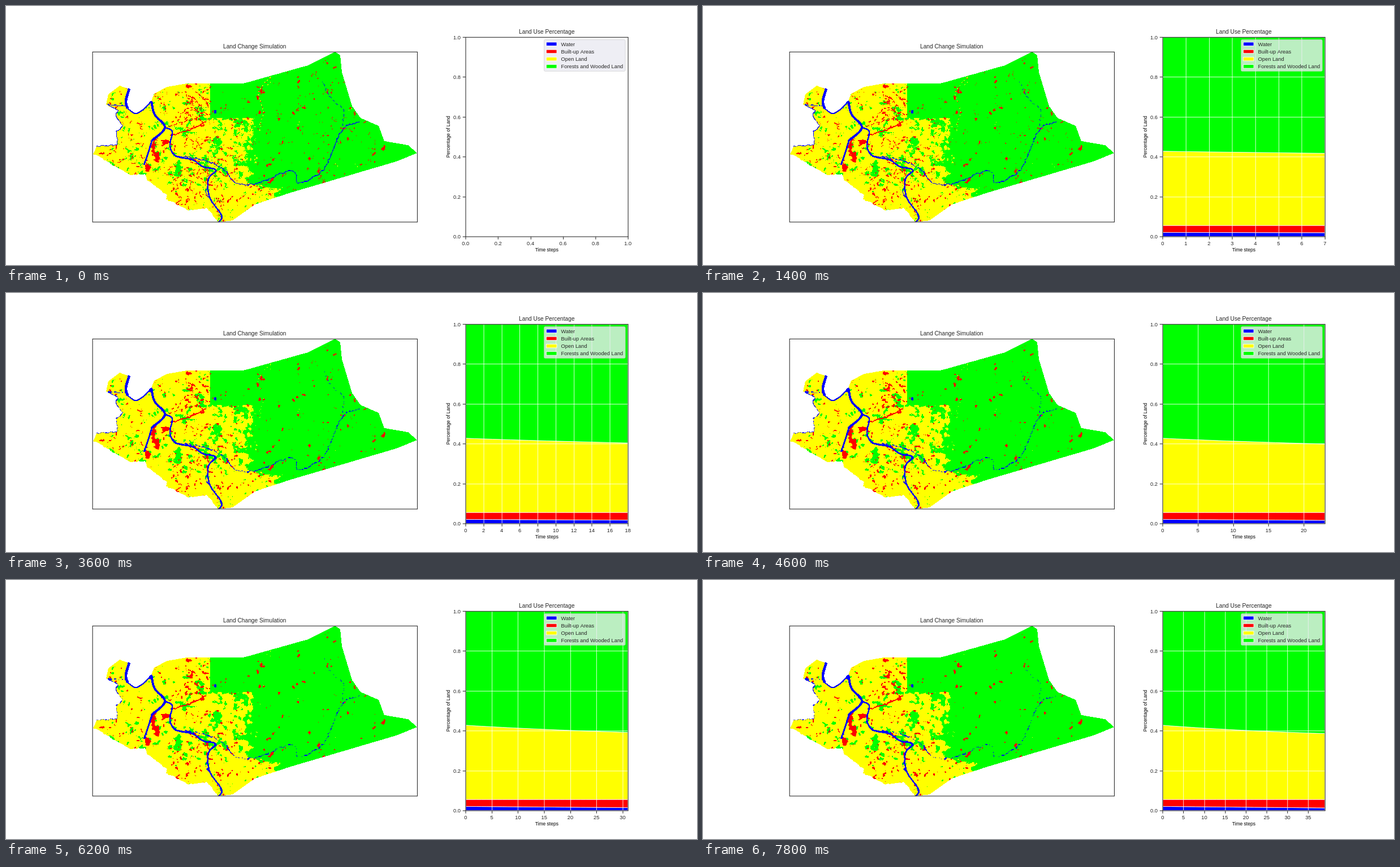
Recreate the animation shown at these times as an HTML page with a canvas. Size 1222 by 458 pixels, loop 8 s.

```html
<!DOCTYPE html>
<html lang="en">
<head>
<meta charset="utf-8">
<title>Land Change Simulation</title>
<style>
  html, body { margin: 0; width: 100%; height: 100%; overflow: hidden; background: #fff; }
  canvas { display: block; }
</style>
</head>
<body>
<canvas id="stage" width="1222" height="458"></canvas>
<script>
const ctx = document.getElementById('stage').getContext('2d');
const STEPS = 40, STEP_MS = 200;
const NONE = 0, WATER = 1, BUILT = 2, OPEN = 3, FOREST = 4;
const RGB = [[255, 255, 255], [0, 0, 255], [255, 0, 0], [255, 255, 0], [0, 255, 0]];
const NAMES = ['', 'Water', 'Built-up Areas', 'Open Land', 'Forests and Wooded Land'];
const css = c => `rgb(${RGB[c]})`;

// The map is in stage pixels; the figure around it is laid out on a 1600 x 600 sheet.
const MAP = { x: 153, y: 81, w: 574, h: 301 };
const FIG = { w: 1600, h: 600, pt: 100 / 72 };
const LEFT = { x: 200, y: 106, w: 751.5, h: 394 };
const RIGHT = { x: 1064.24, y: 72, w: 375.76, h: 462 };
const INK = '#262626';

// ---- chance and noise ----
function hash(x, y) {
  let h = Math.imul(x, 374761393) ^ Math.imul(y, 668265263);
  h = Math.imul(h ^ (h >>> 13), 1274126177);
  h = Math.imul(h ^ (h >>> 15), 2246822519);
  return ((h ^ (h >>> 16)) >>> 0) / 2 ** 32;
}
let draws = 0;
const random = (a, b) => a + (b - a) * hash(++draws, 77);
const mix = (a, b, t) => a + (b - a) * t;
const ramp = (v, a, b) => Math.min(1, Math.max(0, (v - a) / (b - a)));
const ease = t => t * t * (3 - 2 * t);
function noise(x, y) {
  const i = Math.floor(x), j = Math.floor(y), u = ease(x - i), v = ease(y - j);
  return mix(mix(hash(i, j), hash(i + 1, j), u), mix(hash(i, j + 1), hash(i + 1, j + 1), u), v);
}
const texture = (x, y) => .45 * noise(x / 9, y / 9) + .3 * noise(x / 4, y / 4) + .25 * noise(x / 1.6, y / 1.6) - .5;
const bump = (x, y, cx, cy, rx, ry) => Math.exp(-(((x - cx) / rx) ** 2) - ((y - cy) / ry) ** 2);

// ---- terrain ----
function forestBias(x, y) {
  if (y < 198) return x > 360 ? 1 : -.2;
  const e = x - 35 * ramp(y, 312, 322);
  return mix(-.21, -.05, ramp(e, 280, 420)) + .6 * ramp(e, 420, 470)
    - .12 * ramp(y, 312, 325) + .45 * bump(x, y, 304, 290, 8, 9);
}
function cover(x, y) {
  const city = Math.max(bump(x, y, 260, 250, 5, 9), bump(x, y, 267, 268, 5, 8),
    bump(x, y, 252, 286, 5, 8), bump(x, y, 282, 239, 5, 5), bump(x, y, 321, 142, 6, 4));
  if (texture(x + 500, y) + .6 * city > .25) return BUILT;
  return texture(x, y) + forestBias(x, y) > 0 ? FOREST : OPEN;
}

const points = text => text.split(' ').map(p => p.split(',').map(Number));

// Runs through key points, straight (curl 0) or curved (curl 1), shaken by noise.
function course(text, curl, shake) {
  const keys = points(text), out = [];
  for (let i = 0; i + 1 < keys.length; i++) {
    const [a, b] = [keys[i], keys[i + 1]], before = keys[i - 1] || a, after = keys[i + 2] || b;
    const n = Math.ceil(Math.hypot(b[0] - a[0], b[1] - a[1]) / 2);
    for (let s = 0; s <= n; s++) {
      const t = s / n;
      const [x, y] = [0, 1].map(d => mix(a[d], b[d], ease(t)) + curl / 2 *
        (t * (1 - t) ** 2 * (b[d] - before[d]) - t * t * (1 - t) * (after[d] - a[d])));
      out.push([x + (noise(x / 3, y / 3) - .5) * 2 * shake, y + (noise(y / 3 + 40, x / 3) - .5) * 2 * shake]);
    }
  }
  return out;
}

const coast = [
  ...course('177,174 181,156 201,141 218,147 212,168 216,183 229,190 244,182 257,168 262,155 285,143 320,137 420,137 ' +
    '534,105 582,81 591,87 594,117 612,177 627,198 659,212 669,239 711,246 727,260 690,275 500,331 440,351 401,379 376,382', 0, 0),
  ...course('376,382 355,358 322,361 283,342 284,334 250,308 246,297 220,299 154,261 160,248 197,245 196,222 206,212 193,194 198,184 177,174', 0, 1.5)
];

function buildMap() {
  const canvas = document.createElement('canvas');
  canvas.width = MAP.w;
  canvas.height = MAP.h;
  const g = canvas.getContext('2d', { willReadFrequently: true });
  const image = g.createImageData(MAP.w, MAP.h);
  for (let i = 0; i < MAP.w * MAP.h; i++) {
    image.data.set([...RGB[cover(MAP.x + i % MAP.w, MAP.y + Math.floor(i / MAP.w))], 255], i * 4);
  }
  g.putImageData(image, 0, 0);
  g.translate(-MAP.x, -MAP.y);
  g.lineJoin = 'round';

  function trace(path) {
    g.beginPath();
    path.forEach(p => g.lineTo(...p));
  }
  function line(c, width, path, dash = []) {
    g.strokeStyle = css(c);
    g.lineWidth = width;
    g.setLineDash(dash);
    trace(path);
    g.stroke();
  }
  function wander(c, x, y, length, dash) {
    const path = [[x, y]];
    let heading = random(0, 7);
    for (let s = 0; s < length; s += 2) {
      heading += random(-.8, .8);
      path.push([x += 2 * Math.cos(heading), y += 2 * Math.sin(heading)]);
    }
    line(c, random(1.1, 1.7), path, dash);
  }

  // hamlets and lanes, crowded in the middle of the open land
  for (let n = 0; n < 110; n++) {
    const x = 240 + random(0, 100) + random(0, 100), y = random(150, 365);
    if (y > 200 || x < 358) wander(BUILT, x, y, random(3, 22), [5, 2]);
  }
  for (let n = 0; n < 20; n++) wander(BUILT, random(180, 245), random(180, 290), random(2, 8));
  for (let n = 0; n < 14; n++) wander(n % 3 ? BUILT : OPEN, random(445, 640), random(130, 290), 12, [2, 4]);
  line(OPEN, 1.1, course('467,126 446,152 455,188 446,225', 1, 2), [3, 4]);
  line(BUILT, 1.2, course('467,128 446,152 455,188 446,220', 1, 2), [2, 9]);
  line(BUILT, 1.6, course('292,229 330,217 351,207', 1, 2));
  line(BUILT, 1.3, course('288,213 325,202 352,193', 1, 2), [8, 3]);

  g.globalCompositeOperation = 'destination-in';
  g.setLineDash([]);
  trace(coast);
  g.fill();
  g.globalCompositeOperation = 'source-over';

  line(WATER, 4.6, course('218,146 212,168 215,181', 1, 0));
  line(WATER, 2.2, course('215,181 229,190 244,182 257,168', 1, 0));
  line(WATER, 4, course('257,168 263,192 281,215 258,238', 1, 0));
  line(WATER, 2.8, course('258,238 252,258 244,281', 1, 0));
  line(WATER, 2.5, course('281,215 294,222 290,247 300,265 330,272 348,284 371,290 358,306 360,338 381,370 376,382', 1, 0));
  line(WATER, 1.1, course('357,318 354,330 366,350', 1, 1));
  line(WATER, 1.2, course('300,266 345,271 382,287 408,314 450,312 505,290 519,313 560,290 580,250 596,217 625,205', 1, 2));
  line(WATER, 1, course('597,213 595,182 572,160 560,133', 1, 2), [6, 3]);
  line(WATER, 1.1, course('214,178 180,174 198,184 193,194 206,212 196,222 197,245 160,248', 0, 1.5));
  line(WATER, 4, course('370,184 370,190', 0, 0));

  // soft edges fall to one class or the other
  const { data } = g.getImageData(0, 0, MAP.w, MAP.h);
  return Uint8Array.from({ length: MAP.w * MAP.h }, (_, i) => {
    const [r, green, b, a] = data.subarray(i * 4, i * 4 + 4);
    return a < 128 ? NONE : b > 127 ? WATER : r < 128 ? FOREST : green > 127 ? OPEN : BUILT;
  });
}

// Cells with few like neighbours may turn into the commonest class around them.
const WEAK = [0, 3, 2, 4, 2], CHANCE = [0, .03, .07, .07, .06];
const AROUND = [-1, 1, -MAP.w, MAP.w, -MAP.w - 1, -MAP.w + 1, MAP.w - 1, MAP.w + 1];
function evolve(cells, step) {
  const next = cells.slice(), count = [0, 0, 0, 0, 0];
  for (let i = MAP.w + 1; i < cells.length - MAP.w - 1; i++) {
    const c = cells[i];
    if (c === NONE) continue;
    count.fill(0);
    for (const d of AROUND) count[cells[i + d]]++;
    if (count[c] > WEAK[c] || hash(i, step) > CHANCE[c]) continue;
    let best = c;
    for (let k = WATER; k <= FOREST; k++) if (count[k] > count[best]) best = k;
    next[i] = best;
  }
  return next;
}

const states = [buildMap()];
while (states.length < STEPS) states.push(evolve(states[states.length - 1], states.length));

// ---- figure ----
const snap = v => Math.floor(v + .5) + .5;

function label(text, x, y, points, align = 'center', color = INK) {
  ctx.font = `${points * FIG.pt}px "Liberation Sans", Arial, sans-serif`;
  ctx.textAlign = align;
  ctx.fillStyle = color;
  ctx.fillText(text, x, y);
}
function pen(color, points) {
  ctx.strokeStyle = color;
  ctx.lineWidth = points * FIG.pt;
}
function segment(x1, y1, x2, y2) {
  ctx.beginPath();
  ctx.moveTo(x1, y1);
  ctx.lineTo(x2, y2);
  ctx.stroke();
}
function frameAxes({ x, y, w, h }, title) {
  pen(INK, 1);
  ctx.strokeRect(snap(x), snap(y), snap(x + w) - snap(x), snap(y + h) - snap(y));
  label(title, x + w / 2, y - 6 * FIG.pt, 9.6);
}

function drawMap(step) {
  const image = ctx.createImageData(MAP.w, MAP.h);
  states[step].forEach((c, i) => image.data.set([...RGB[c], 255], i * 4));
  ctx.putImageData(image, MAP.x, MAP.y);
}

const tops = k => [0, .0205 - .0075 * k / 39, .0555, .4275 - .0716 * (1 - Math.exp(-k / 45)), 1];

function drawChart(step) {
  const { x, y, w, h } = RIGHT, right = x + w, bottom = y + h, tick = 4.8 * FIG.pt;
  const span = step || 1;
  const plotX = k => x + w * k / span, plotY = v => bottom - h * v;
  const gap = [.2, .25, .5, 1, 2, 2.5, 5].find(s => span / s <= 9);
  const digits = gap % 1 ? String(gap).split('.')[1].length : 0;

  if (step) {
    ctx.save();
    ctx.beginPath();
    ctx.rect(x, y, w, h);
    ctx.clip();
    pen('#fff', .8);
    for (let c = WATER; c <= FOREST; c++) {
      ctx.beginPath();
      for (let k = 0; k <= step; k++) ctx.lineTo(plotX(k), plotY(tops(k)[c]));
      for (let k = step; k >= 0; k--) ctx.lineTo(plotX(k), plotY(tops(k)[c - 1]));
      ctx.closePath();
      ctx.fillStyle = css(c);
      ctx.fill();
      ctx.stroke();
    }
    ctx.restore();
  }

  for (let n = 0; n * gap <= span + 1e-6; n++) {
    const at = snap(plotX(n * gap));
    pen('#fff', .8);
    segment(at, y, at, bottom);
    pen(INK, 1);
    segment(at, bottom, at, bottom + tick);
    label((n * gap).toFixed(digits), plotX(n * gap), 554, 8.8);
  }
  for (let n = 0; n <= 5; n++) {
    const at = snap(plotY(n / 5));
    pen('#fff', .8);
    segment(x, at, right, at);
    pen(INK, 1);
    segment(x - tick, at, x, at);
    label((n / 5).toFixed(1), x - tick - 3.5 * FIG.pt, at + 4.2, 8.8, 'right');
  }

  label('Time steps', x + w / 2, 568, 8, 'center', '#000');
  ctx.save();
  ctx.translate(1027.8, y + h / 2);
  ctx.rotate(-Math.PI / 2);
  label('Percentage of Land', 0, 0, 8, 'center', '#000');
  ctx.restore();
}

function drawLegend() {
  const em = 8.8 * FIG.pt, row = 17.3, x = 1246, y = RIGHT.y + em / 2;
  ctx.globalAlpha = .8;
  ctx.beginPath();
  ctx.roundRect(x, y, RIGHT.x + RIGHT.w - em / 2 - x, 73, em * .2);
  ctx.fillStyle = '#eaeaf2';
  ctx.fill();
  pen('#ccc', .8);
  ctx.stroke();
  ctx.globalAlpha = 1;
  for (let c = WATER; c <= FOREST; c++) {
    const middle = y + 10 + row * (c - 1);
    const swatch = [x + .4 * em, middle - .35 * em, 2 * em, .7 * em];
    ctx.fillStyle = css(c);
    ctx.fillRect(...swatch);
    pen('#fff', .8);
    ctx.strokeRect(...swatch);
    label(NAMES[c], x + 3.2 * em, middle + .35 * em, 8.8, 'left');
  }
}

function draw(step) {
  ctx.fillStyle = '#fff';
  ctx.fillRect(0, 0, 1222, 458);
  drawMap(step);
  ctx.save();
  ctx.scale(1222 / FIG.w, 458 / FIG.h);
  drawChart(step);
  frameAxes(LEFT, 'Land Change Simulation');
  frameAxes(RIGHT, 'Land Use Percentage');
  drawLegend();
  ctx.restore();
}

let shown = -1;
const start = performance.now();
function tick() {
  const step = Math.floor((performance.now() - start) / STEP_MS) % STEPS;
  if (step !== shown) draw(shown = step);
  requestAnimationFrame(tick);
}
tick();
</script>
</body>
</html>
```
